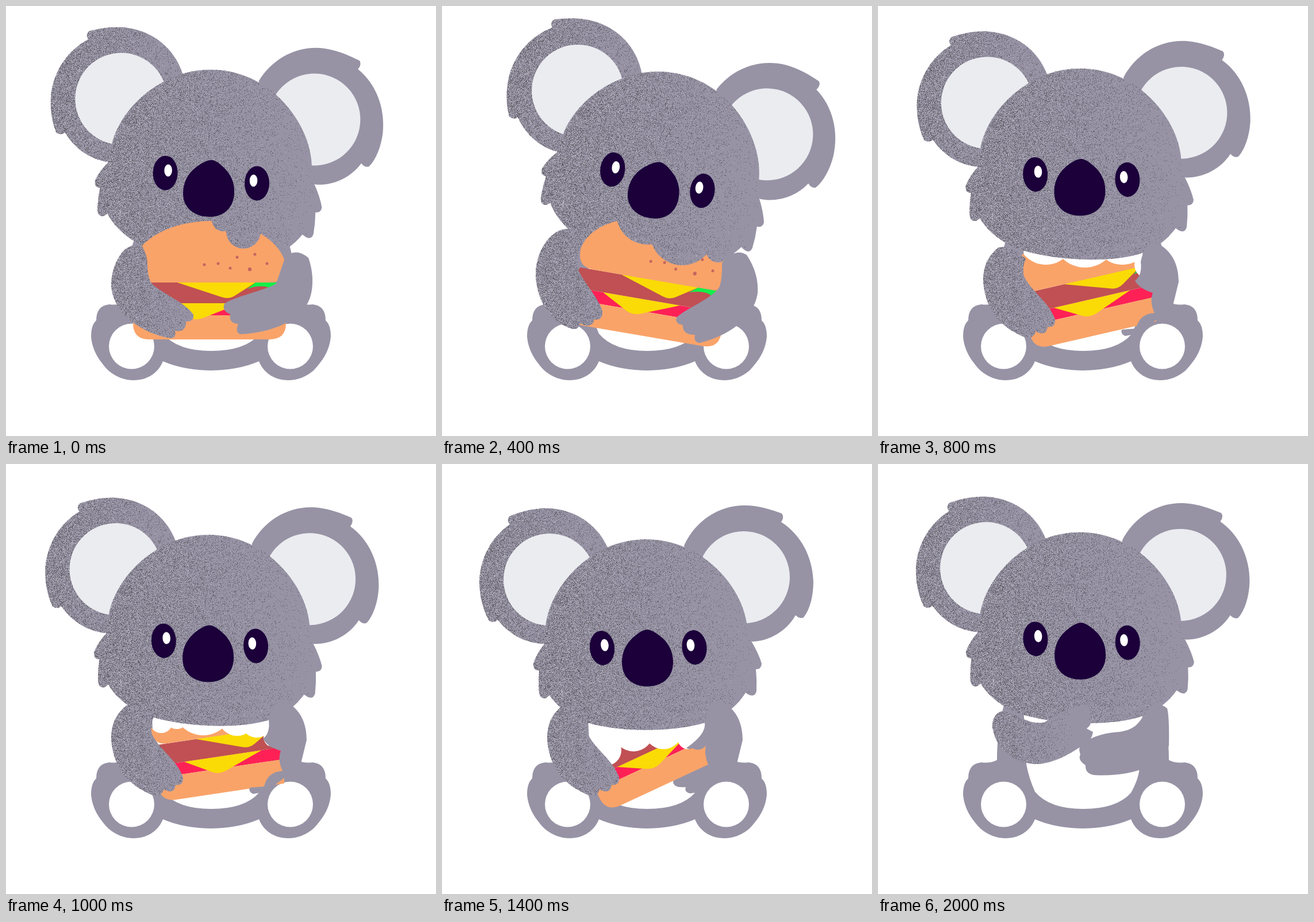
An HTML page with a canvas for the animation above (2.2 s loop, 748 by 748 pixels).

```html
<!DOCTYPE html>
<html lang="en">
<head>
<meta charset="utf-8">
<title>Koala eating a burger</title>
<style>
html, body { margin: 0; width: 100%; height: 100%; overflow: hidden; background: #fff; }
canvas { display: block; }
</style>
</head>
<body>
<canvas id="stage" width="748" height="748"></canvas>
<script>
const SIZE = 748, STEP = 200;
const FUR = '#9793a5', INK = '#1b003a', EAR = '#ebecf0', BUN = '#f9a369',
      PATTY = '#c05053', CHEESE = '#fadb05', TOMATO = '#ff2156', LEAF = '#12f048';
const ctx = document.getElementById('stage').getContext('2d');
const burgerCanvas = makeCanvas();
const burgerCtx = burgerCanvas.getContext('2d');

function makeCanvas() {
  return Object.assign(document.createElement('canvas'), { width: SIZE, height: SIZE });
}

function fill(c, path, color) {
  c.fillStyle = color;
  c.fill(typeof path === 'string' ? new Path2D(path) : path);
}

function oval(c, x, y, rx, ry, color, tilt = 0) {
  c.fillStyle = color;
  c.beginPath();
  c.ellipse(x, y, rx, ry, tilt * Math.PI / 180, 0, 7);
  c.fill();
}

// Speckles that thin out from x = from to x = to.
let seed = 7;
function random() {
  seed = (Math.imul(seed, 1664525) + 1013904223) >>> 0;
  return seed / 4294967296;
}
function grain(from, to) {
  const canvas = makeCanvas(), c = canvas.getContext('2d');
  const image = c.createImageData(SIZE, SIZE);
  for (let i = 0; i < SIZE * SIZE; i++) {
    const density = Math.min(1, Math.max(0, (to - i % SIZE) / (to - from)));
    const r = random();
    const color = r < 0.36 * density ? [100, 97, 106]
                : r > 1 - 0.2 * density * density ? [186, 184, 194] : null;
    if (color) image.data.set([...color, 255], i * 4);
  }
  c.putImageData(image, 0, 0);
  return canvas;
}
const headGrain = grain(150, 540), earGrain = grain(60, 315), armGrain = grain(165, 340);

function furry(path, texture) {
  const shape = new Path2D(path);
  fill(ctx, shape, FUR);
  ctx.save();
  ctx.clip(shape);
  ctx.imageSmoothingEnabled = false;
  ctx.drawImage(texture, 0, 0);
  ctx.restore();
}

const HALF_BODY = 'M360 400H225C211 440 207 480 207 515Q195 521 180 519Q157 521 157 547Q148 555 148 575C150 600 163 618 178 634Q198 651 222 651C248 651 266 636 273 618Q310 634 360 634Z';
const BELLY = 'M253 420L258 522Q262 545 273 570Q298 600 357 600Q415 600 440 572Q455 545 455 525L461 420Z';
const LEFT_EAR = 'M180 77C158 77 135 84 119 90Q111 96 118 105C85 128 66 165 65 205C65 230 72 255 82 273Q91 277 97 271C120 300 150 313 182 313L240 290L288 145C270 105 230 77 180 77Z';
const RIGHT_EAR = 'M527 72C550 72 575 80 591 86Q596 92 590 101C625 123 645 163 646 205C646 230 640 253 629 267Q622 270 615 263C600 290 570 308 540 309L470 285L421 142C440 100 480 72 527 72Z';
const HEAD = 'M355 131C395 131 430 145 455 163C500 195 527 242 531 284L538 308Q551 330 556 347Q556 357 546 357Q548 376 547 395Q544 409 528 398C512 423 490 440 458 450C400 467 310 467 253 450C225 440 200 422 187 402L181 407Q171 410 169 398Q167 380 169 359Q158 360 159 347Q164 331 178 313L180 284C184 242 211 195 256 163C281 145 315 131 355 131Z';
const NOSE = 'M357 288C365 288 376 296 385 304C396 315 402 328 402 345C402 372 382 387 357 387C332 387 313 372 313 345C313 328 319 315 330 304C338 296 349 288 357 288Z';

// Outline pairs for the arms; `behind` puts the right arm under the burger.
const ARMS = {
  hold: {
    left: 'M240 421Q222 410 204 426Q183 452 183 487C187 540 245 572 287 578Q297 577 294 565Q314 568 313 549Q328 549 326 537C312 515 270 500 253 482Q246 472 246 450Q246 432 236 417Z',
    right: 'M486 436Q505 420 526 438C536 465 536 500 523 520C505 550 460 568 408 571Q398 568 404 553Q387 552 390 536Q375 530 380 518C395 506 450 495 470 483Q476 465 486 436Z'
  },
  lift: {
    left: 'M262 390Q225 384 205 390C175 405 163 440 163 468C165 520 195 553 228 562Q238 563 240 552Q262 562 265 545Q280 548 279 531C272 505 240 475 235 452Q236 410 262 390Z',
    right: 'M487 447Q510 420 530 433C545 455 551 480 549 500C542 545 495 575 448 586Q437 585 440 572Q418 572 419 555Q405 553 408 542C425 525 470 510 483 488Q488 470 487 447Z'
  },
  tilt: {
    left: 'M256 420Q238 398 215 404C190 425 175 450 175 478C178 530 210 560 242 574Q252 574 252 562Q272 573 273 557Q292 558 290 540C278 515 245 490 243 465Q248 445 256 421Z',
    right: 'M457 440Q455 400 485 405C510 420 523 450 523 478L512 525L452 570L430 574Q421 570 422 558L439 556Q440 530 463 522Q445 490 460 465L470 457Z'
  },
  chew: {
    left: 'M257 440Q230 415 210 420C190 435 183 455 183 478C186 530 215 560 257 577Q272 578 274 566Q293 576 295 558Q309 560 308 545C298 515 265 495 254 470Q250 455 257 440Z',
    right: 'M457 445Q465 405 490 415C515 430 523 455 523 480L512 525L452 570L430 574Q421 570 424 563L449 561Q455 535 481 534Q472 515 478 499Q455 492 447 478Q460 468 457 445Z'
  },
  low: {
    behind: true,
    right: 'M457 450Q465 405 490 415C515 430 523 455 523 480L512 525L452 570L432 573Q421 571 424 562Q402 564 402 552L440 500L425 494Q460 470 457 450Z'
  },
  last: {
    behind: true,
    left: 'M257 430Q245 412 222 413C203 430 194 450 194 478C198 535 250 568 295 573Q306 573 306 561Q325 564 326 545Q341 546 336 530C318 508 275 495 259 470Z',
    right: 'M461 435Q480 406 497 418C512 438 517 465 515 495L510 520L450 570Q440 578 427 582L405 584Q396 580 400 570Q378 568 380 553Q368 548 372 542L445 500L444 475Q457 478 455 460Q455 445 461 435Z'
  },
  empty: {
    left: 'M215 430Q198 436 199 458C206 500 240 522 278 522C310 520 340 500 355 490Q372 482 374 466Q366 462 363 460Q374 452 367 445Q372 425 363 419C335 420 310 438 290 449C262 456 240 432 215 430Z',
    right: 'M468 428Q485 410 503 425Q507 440 506 490C495 525 440 545 375 541Q360 538 361 524Q347 515 352 505Q346 490 360 483Q385 468 420 466C445 462 452 455 468 428Z'
  }
};
ARMS.low.left = ARMS.chew.left;

// head, burger: [x, y, degrees]; everything above `top`, right of `right`
// and inside the bites [x, y, radius] is eaten.
const POSES = [
  { head: [357, 300, 6.8], arms: 'hold', burger: [272, 517, 0],
    bites: [[413, 392, 30], [378, 372, 20]] },
  { head: [355, 305, 3.6], arms: 'hold', burger: [272, 517, 0],
    bites: [[413, 392, 30], [378, 372, 20]] },
  { head: [375, 303.5, 13.7], arms: 'lift', burger: [280, 498, 9.7], top: 371,
    bites: [[358, 360, 55], [418, 395, 56], [480, 425, 21]] },
  { head: [359.5, 290, -1.2], arms: 'tilt', burger: [297, 540, -19], top: 398, right: 495,
    bites: [[297, 380, 55], [368, 376, 64], [492, 400, 52], [210, 430, 45]] },
  { head: [354, 298, 3.6], arms: 'chew', burger: [306, 525, -13], top: 430, right: 484,
    bites: [[292, 400, 50], [360, 400, 55], [425, 400, 50], [470, 450, 24]] },
  { head: [354.7, 312.5, 3.6], arms: 'chew', burger: [310, 518, -8.5], top: 456, right: 484,
    bites: [[270, 448, 20], [297, 440, 21], [343, 420, 52], [402, 440, 33], [436, 450, 26], [466, 475, 18]] },
  { head: [358.5, 295, 0], arms: 'chew', burger: [309, 522, -15], top: 470, right: 484,
    bites: [[275, 460, 27], [305, 455, 25], [345, 450, 38], [400, 455, 32], [445, 460, 28]] },
  { head: [359, 320, 0], arms: 'low', burger: [305, 527, -25], top: 484,
    bites: [[285, 498, 27], [333, 465, 35], [385, 462, 34], [428, 478, 18], [445, 480, 17], [510, 500, 52]] },
  { head: [353, 302, 5.4], arms: 'last', burger: [350, 484, -30], top: 446, right: 495,
    bites: [[270, 462, 36], [307, 462, 31], [336, 452, 24], [362, 470, 26], [385, 450, 34],
            [412, 456, 41], [454, 458, 17], [487, 445, 12]] },
  { head: [358, 313, 0.5], arms: 'empty' },
  { head: [354.3, 308, 2.7], arms: 'empty' }
];

const SEEDS = [[345, 450], [369, 448], [390, 456], [402, 437], [433, 432], [424, 458, 3.2], [454, 448]];

function place(c, [x, y, degrees], pivotX, pivotY) {
  c.translate(x, y);
  c.rotate(degrees * Math.PI / 180);
  c.translate(-pivotX, -pivotY);
}

function drawBody() {
  for (const mirrored of [false, true]) {
    ctx.save();
    if (mirrored) ctx.transform(-1, 0, 0, 1, 713, 0);
    fill(ctx, HALF_BODY, FUR);
    oval(ctx, 218.5, 592, 39.5, 39.5, '#fff');
    ctx.restore();
  }
  fill(ctx, BELLY, '#fff');
}

function drawHead(head) {
  ctx.save();
  place(ctx, head, 359, 320);
  furry(LEFT_EAR, earGrain);
  fill(ctx, RIGHT_EAR, FUR);
  oval(ctx, 187, 201, 80, 80, EAR);
  oval(ctx, 525, 197, 80, 80, EAR);
  furry(HEAD, headGrain);
  oval(ctx, 278.5, 320, 21.5, 30, INK, -6);
  oval(ctx, 439, 319, 21.5, 30, INK, -6);
  oval(ctx, 283, 315, 6.8, 10.6, '#fff', -6);
  oval(ctx, 432.5, 315, 6.8, 10.6, '#fff', -6);
  fill(ctx, NOSE, INK);
  ctx.restore();
}

function drawBurger({ burger, top = 0, right = SIZE, bites }) {
  const c = burgerCtx;
  c.clearRect(0, 0, SIZE, SIZE);
  c.save();
  place(c, burger, 272, 517);
  fill(c, 'M226 517H482V538H226Z', TOMATO);
  fill(c, 'M226 481H484Q494 500 484 517H226Q214 500 226 481Z', PATTY);
  fill(c, 'M420 492L434 481H475L478 494Q465 497 455 489Q440 485 420 492Z', LEAF);
  fill(c, 'M298 481H434L398 504Q387 511 374 506Z', CHEESE);
  fill(c, 'M221 538H487V552Q487 580 458 580H249Q221 580 221 552Z', BUN);
  fill(c, 'M272 517H408L342 543Q328 548 316 541Z', CHEESE);
  fill(c, 'M249 481Q221 481 221 452C225 405 290 374 357 374C425 374 480 410 487 452Q487 481 460 481Z', BUN);
  for (const [x, y, r = 2.5] of SEEDS) oval(c, x, y, r, r, '#c4665f');
  c.restore();

  c.globalCompositeOperation = 'destination-out';
  c.fillRect(0, 0, SIZE, top);
  c.fillRect(right, 0, SIZE, SIZE);
  for (const [x, y, r] of bites) oval(c, x, y, r, r, '#000');
  c.globalCompositeOperation = 'source-over';
  ctx.drawImage(burgerCanvas, 0, 0);
}

function draw(now) {
  const pose = POSES[Math.floor(now / STEP) % POSES.length];
  const arms = ARMS[pose.arms];
  ctx.fillStyle = '#fff';
  ctx.fillRect(0, 0, SIZE, SIZE);
  drawBody();
  drawHead(pose.head);
  if (arms.behind) fill(ctx, arms.right, FUR);
  if (pose.burger) drawBurger(pose);
  if (!arms.behind) fill(ctx, arms.right, FUR);
  furry(arms.left, armGrain);
  requestAnimationFrame(draw);
}
requestAnimationFrame(draw);
</script>
</body>
</html>
```
